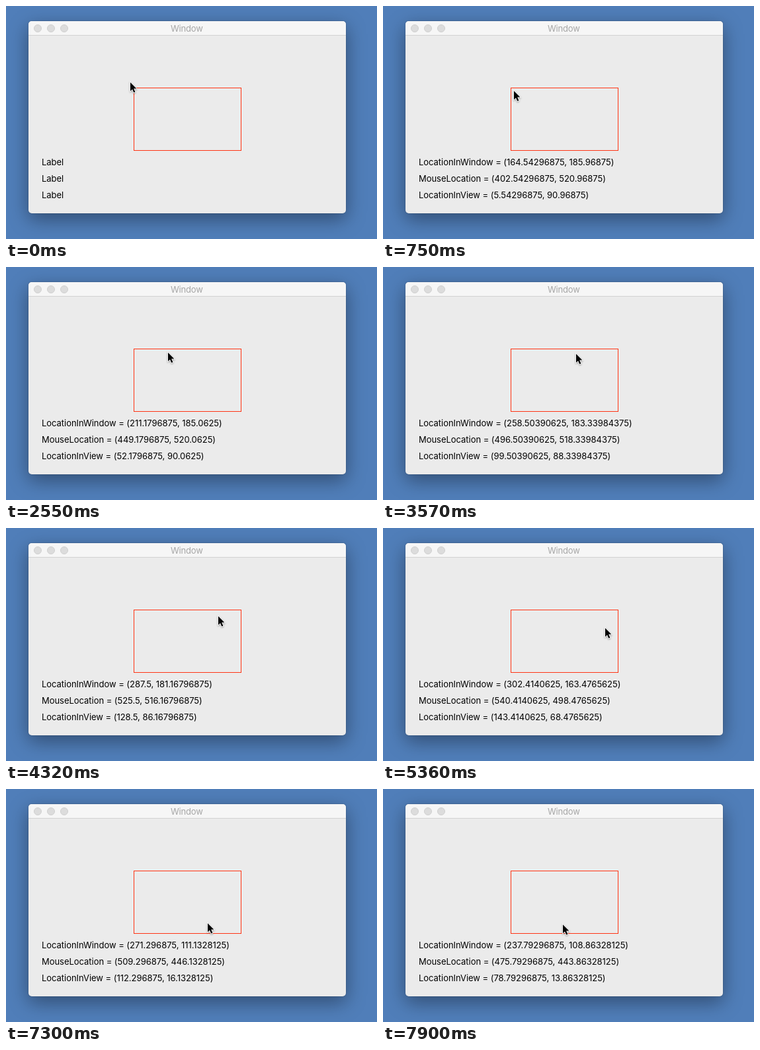
An HTML page for the animation above (8 s loop, 561x354 px).

```html
<!DOCTYPE html>
<html lang="en">
<head>
<meta charset="utf-8">
<title>Window</title>
<style>
  html, body { margin: 0; width: 100%; height: 100%; overflow: hidden; background: #507eb9; }
  svg { display: block; }
  .window { filter: drop-shadow(0 9px 15px rgba(0, 0, 0, .32)) drop-shadow(0 0 1px rgba(0, 0, 0, .25)); }
  text { font: 13px Inter, "Noto Sans", sans-serif; letter-spacing: -.04px; white-space: pre; }
  .title { fill: #a6a6a6; text-anchor: middle; letter-spacing: -.17px; }
  .cursor { filter: drop-shadow(0 1px 1px rgba(0, 0, 0, .35)); }
</style>
</head>
<body>
<svg width="561" height="354" viewBox="0 0 561 354">
  <g class="window">
    <rect x="34" y="23" width="480" height="292" rx="5" fill="#ebebeb"/>
    <path d="M34 45V28a5 5 0 0 1 5-5H509a5 5 0 0 1 5 5V45z" fill="#f6f6f6"/>
  </g>
  <path d="M34 44.5H514" stroke="#d2d2d2"/>
  <g fill="#dcdcdc" stroke="#d0d0d0">
    <circle cx="48" cy="34" r="5.5"/>
    <circle cx="68" cy="34" r="5.5"/>
    <circle cx="88" cy="34" r="5.5"/>
  </g>
  <text class="title" x="273.3" y="39">Window</text>
  <rect x="193.5" y="124.5" width="162" height="95" fill="none" stroke="#ff3414"/>
  <text class="label" x="54" y="242"></text>
  <text class="label" x="54" y="267"></text>
  <text class="label" x="54" y="292"></text>
  <path class="cursor" d="M0 0V13.2L3 10.4L5.2 15.6L7.4 14.7L5.2 9.6H9.4z"
    fill="#000" stroke="#fff" stroke-width="1.6" paint-order="stroke"/>
</svg>
<script>
const LOOP = 8000, TICK = 150;

// Pointer path: ticks spent moving, then x and y from the window's lower left corner
const path = [
  [0, 154.5, 199],
  [5, 164.543, 185.969],
  [10, 211.18, 185.0625],
  [17, 258.504, 183.34],
  [24, 299.1, 180.3],
  [27, 302.414, 163.477],
  [34, 304.805, 113.406],
  [44, 221.039, 107.727]
];

const labels = document.querySelectorAll('.label');
const cursor = document.querySelector('.cursor');
const clamp = (v, max) => Math.min(Math.max(v, 0), max);
const snap = v => Math.round(v * 256) / 256;

// Ticks spent moving so far: the pointer rests after ticks 5, 31 and 43
function movedTicks(ms) {
  const lead = clamp((ms - 2600) / 32, 50);
  const tick = Math.floor((ms + lead) / TICK);
  return tick - clamp(tick - 5, 7) - clamp(tick - 31, 2) - clamp(tick - 43, 2);
}

function pointAt(n) {
  const i = Math.max(1, path.findIndex(p => p[0] >= n));
  const [n0, x0, y0] = path[i - 1], [n1, x1, y1] = path[i];
  const k = (n - n0) / (n1 - n0);
  return [snap(x0 + (x1 - x0) * k), snap(y0 + (y1 - y0) * k)];
}

function draw(ms) {
  const [x, y] = pointAt(movedTicks(ms % LOOP));
  const inside = x >= 159 && y <= 190;
  const line = (name, dx, dy) => inside ? `${name} = (${x + dx}, ${y + dy})` : 'Label';
  labels[0].textContent = line('LocationInWindow', 0, 0);
  labels[1].textContent = line('MouseLocation', 238, 335);
  labels[2].textContent = line('LocationInView', -159, -95);
  cursor.setAttribute('transform', `translate(${Math.round(x + 33.8)} ${Math.round(315 - y)})`);
}

let start;
function frame(now) {
  start ??= now;
  draw(now - start);
  requestAnimationFrame(frame);
}
draw(0);
requestAnimationFrame(frame);
</script>
</body>
</html>
```
